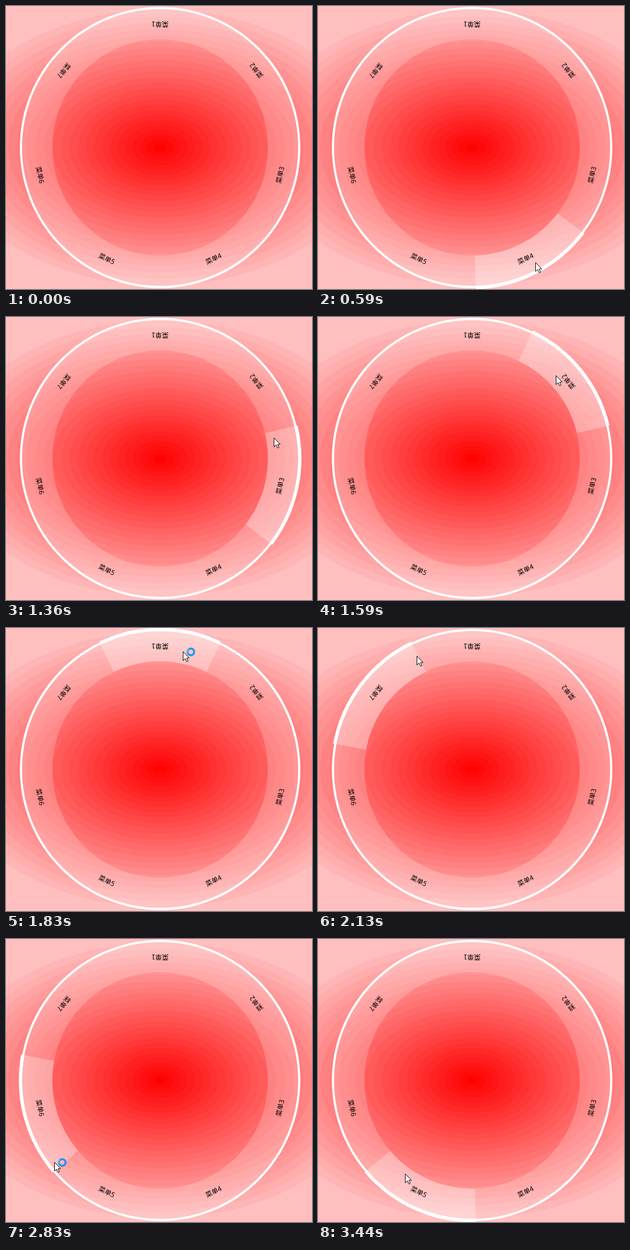
An HTML page for the animation above (3.52 s loop, 552 px wide and 509 px high).

```html
<!DOCTYPE html>
<html lang="zh-CN">
<head>
<meta charset="utf-8">
<title>环形菜单</title>
<style>
  html, body { margin: 0; width: 100%; height: 100%; overflow: hidden; background: #ffbfbf; }
  svg { display: block; width: 552px; height: 509px; }
  text { font: 12px "Noto Sans CJK SC", "Noto Sans CJK", "Noto Sans", sans-serif; text-anchor: middle; }
</style>
</head>
<body>
<svg viewBox="0 0 552 509">
  <g fill="none" stroke="#fff" transform="translate(278 254.5)">
    <g id="glow" stroke="none"></g>
    <circle r="222.5" stroke-width="56" stroke-opacity=".2"/>
    <path id="wedge" stroke-width="56" stroke-opacity=".27"/>
    <circle r="251" stroke-width="4"/>
    <path id="rim" stroke-width="6"/>
    <g id="labels" fill="#000" stroke="none"></g>
  </g>
  <g id="cursor">
    <g id="busy" fill="none" stroke-width="3.6" transform="translate(14.5 1)">
      <circle r="6" stroke="#2492f0"/>
      <path d="M-5.6 2A6 6 0 0 1 -4 -4.5" stroke="#4db4f5"/>
    </g>
    <path d="M.5 .5V16.5L4.3 13 7 18.7 9.4 17.6 6.9 12H11.5Z" fill="#fff" stroke="#000"/>
  </g>
</svg>
<script>
const NS = 'http://www.w3.org/2000/svg';
const CX = 278, CY = 254.5, RAD = Math.PI / 180;
const LOOP = 3520, START = 130, STEP = 540 / 7;
const COUNT = 7, SPAN = 51, FIRST = -115.5;
const $ = id => document.getElementById(id);

function add(parent, tag, attrs, text = '') {
  const el = document.createElementNS(NS, tag);
  for (const name in attrs) el.setAttribute(name, attrs[name]);
  el.textContent = text;
  parent.append(el);
}

// Banded elliptical glow, widest band first
const edge = i => i < 0 ? 0 : Math.min(390, 11.4 + 12.46 * i + 0.12 * i * i);
for (let i = 24; i >= 0; i--) {
  const rx = edge(i);
  const tint = Math.round(191 * (rx + edge(i - 1)) / 780);
  add($('glow'), 'ellipse', { rx, ry: rx / 1.533, fill: `rgb(255,${tint},${tint})` });
}

for (let i = 0; i < COUNT; i++) {
  const turn = i * 360 / COUNT + 180;
  add($('labels'), 'text', { transform: `rotate(${turn}) translate(0 222)`, y: 4.5 }, '菜单' + (i + 1));
}

// Pointer stops: step, radius, angle around the centre
const stops = [
  [0, 312.5, 48.8], [6, 235.9, 61.1], [16, 208.4, -10.4], [22, 216.4, -79.1],
  [26, 227.6, -116.06], [35, 240.7, -217.5], [38, 232.5, -246.7],
  [41, 232.5, -246.7], [43, 206.6, -234.2]
];
const busySteps = [22, 23, 35, 36];

function pointerAt(step) {
  let i = 1;
  while (i < stops.length - 1 && stops[i][0] < step) i++;
  const [s0, r0, a0] = stops[i - 1], [s1, r1, a1] = stops[i];
  const p = Math.min(1, (step - s0) / (s1 - s0));
  return [r0 + (r1 - r0) * p, a0 + (a1 - a0) * p];
}

function arc(r, from, to) {
  const at = a => `${r * Math.cos(a * RAD)} ${r * Math.sin(a * RAD)}`;
  return `M${at(from)}A${r} ${r} 0 0 1 ${at(to)}`;
}

function highlight(r, angle) {
  if (r < 194.5 || r > 255) return ['', ''];
  const offset = ((angle - FIRST) % 360 + 360) % 360;
  const index = Math.min(COUNT - 1, Math.floor(offset / SPAN));
  const from = FIRST + index * SPAN;
  const to = index === COUNT - 1 ? FIRST + 360 : from + SPAN;
  return [arc(222.5, from, to), arc(252, from, to)];
}

let shown;
function draw(time) {
  const step = Math.floor((time % LOOP - START) / STEP + 0.14);
  if (step === shown) return;
  shown = step;
  const active = time % LOOP >= START && step >= 0;
  const [r, angle] = pointerAt(Math.max(0, step));
  const [wedge, rim] = active ? highlight(r, angle) : ['', ''];
  $('wedge').setAttribute('d', wedge);
  $('rim').setAttribute('d', rim);
  const x = Math.round(CX + r * Math.cos(angle * RAD));
  const y = Math.round(CY + r * Math.sin(angle * RAD));
  $('cursor').setAttribute('transform', `translate(${x} ${y})`);
  $('cursor').style.display = active ? '' : 'none';
  $('busy').style.display = busySteps.includes(step) ? '' : 'none';
}

const origin = performance.now();
function tick() {
  draw(performance.now() - origin);
  requestAnimationFrame(tick);
}
tick();
</script>
</body>
</html>
```
